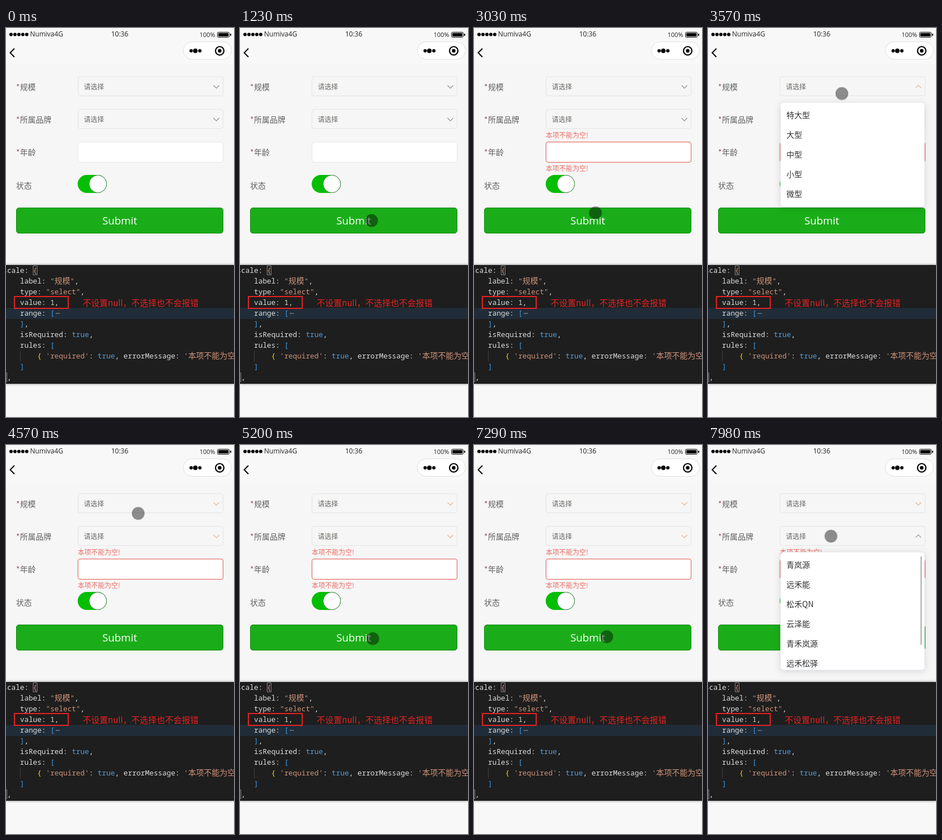
Animation, 407 px wide and 691 px high, one loop 8 s. Source, as an HTML page:

```html
<!DOCTYPE html>
<html lang="zh-CN">
<head>
<meta charset="utf-8">
<title>Form validation</title>
<style>
  html, body { margin: 0; width: 100%; height: 100%; overflow: hidden; background: #f6f6f6; }
  svg { display: block; width: 407px; height: 691px; }
  text { font-family: "Noto Sans CJK SC", "Noto Sans CJK", "Noto Sans", sans-serif; white-space: pre; }

  .status text { font: 12px "Open Sans", "Noto Sans", sans-serif; fill: #222; }
  .label { font-size: 14px; fill: #606060; }
  .star { fill: #8f5f58; }
  .hint { font-size: 12px; fill: #6a6a66; }
  .box { fill: none; stroke: #e5e5e5; }
  .err text { font-size: 12px; fill: #ee6a64; }
  .arrow { fill: none; stroke: #8c8f84; stroke-width: 1.1; }
  .submit { font: 18.8px "Open Sans", "Noto Sans", sans-serif; fill: #fff; text-anchor: middle; }

  .panel { fill: #fff; stroke: #ebeef5; filter: drop-shadow(0 2px 6px rgba(0, 0, 0, .13)); }
  .list text { font-size: 14px; fill: #303133; }

  .code text { font: 12.83px "Noto Sans Mono", "DejaVu Sans Mono", monospace; fill: #dcdcdc; }
  .code .s { fill: #ce9178; }
  .code .zh { font: 14px "Noto Sans CJK SC", "Noto Sans CJK", sans-serif; }
  .code .k { fill: #569cd6; }
  .code .b { fill: #3a9be8; }
  .code .y { fill: #ffd700; }
  .code .p { fill: #d7a08c; }
  .code .n { fill: #cfdcc6; }
  .code .d { fill: #808890; }

  .cursor { animation: move 8s linear infinite; }
  .shown { animation: shown 8s step-end infinite; }
  .field { fill: #fff; stroke: #e5e5e5; animation: invalid 8s step-end infinite; }
  .err { animation: slide 8s linear infinite; }
  .btn { fill: #1aad19; animation: press 8s step-end infinite; }
  .submit { animation: dim 8s step-end infinite; }
  .arrow { animation: tint 8s step-end infinite; }
  .open1 { animation: open1 8s step-end infinite; }
  .shut1 { animation: shut1 8s step-end infinite; }
  .open2 { animation: open2 8s step-end infinite; }
  .shut2 { animation: shut2 8s step-end infinite; }

  @keyframes shown { 0% { opacity: 0 } 9.625%, 100% { opacity: 1 } }
  @keyframes invalid { 0% { stroke: #e5e5e5 } 24.375%, 100% { stroke: #e2574f } }
  @keyframes slide {
    0%, 24.375% { opacity: 0; transform: translateY(-17px); animation-timing-function: ease }
    28.25%, 100% { opacity: 1; transform: none }
  }
  @keyframes press {
    0%, 24.375%, 68.75%, 100% { fill: #1aad19 }
    21.875%, 67.875% { fill: #179b16 }
  }
  @keyframes dim {
    0%, 24.375%, 68.75%, 100% { fill: #fff }
    21.875%, 67.875% { fill: rgba(255, 255, 255, .6) }
  }
  @keyframes tint { 0% { stroke: #8c8f84 } 44.625%, 100% { stroke: #dfb697 } }
  @keyframes open1 { 0%, 52.5%, 100% { opacity: 0 } 44.625% { opacity: 1 } }
  @keyframes shut1 { 0%, 52.5%, 100% { opacity: 1 } 44.625% { opacity: 0 } }
  @keyframes open2 { 0% { opacity: 0 } 98.5%, 100% { opacity: 1 } }
  @keyframes shut2 { 0% { opacity: 1 } 98.5%, 100% { opacity: 0 } }
  @keyframes move {
    0%, 9.625% { transform: translate(391px, 682px) }
    11.875% { transform: translate(345px, 560px) }
    13.5% { transform: translate(303px, 425px) }
    14.25% { transform: translate(283px, 366px) }
    15.375% { transform: translate(235px, 342px) }
    18.5%, 37.874% { transform: translate(216.5px, 332px) }
    37.875% { transform: translate(216.5px, 329px) }
    39.125% { transform: translate(243px, 260px) }
    40% { transform: translate(251px, 195px) }
    40.875% { transform: translate(247px, 138px) }
    41.75%, 46.374% { transform: translate(239px, 116.5px) }
    47.125%, 57.124% { transform: translate(238.5px, 108.5px) }
    57.125% { transform: translate(236px, 121px) }
    60% { transform: translate(231.5px, 232px) }
    62.5% { transform: translate(234px, 322px) }
    65%, 91.124% { transform: translate(237px, 344px) }
    91.125% { transform: translate(237px, 341px) }
    93.75% { transform: translate(230px, 236px) }
    96.375%, 98.499% { transform: translate(220px, 160.5px) }
    98.5%, 100% { transform: translate(219.5px, 162px) }
  }
</style>
</head>
<body>
<svg viewBox="0 0 407 691">
  <defs>
    <path id="down" d="M370.5 102l5 5 5-5"/>
    <clipPath id="view"><rect x="129" y="195" width="258" height="200"/></clipPath>
  </defs>
  <rect width="407" height="691" fill="#f6f6f6"/>
  <rect width="407" height="64" fill="#f8f8f8"/>
  <rect y="632" width="407" height="59" fill="#f8f8f8"/>

  <!-- status and title bar -->
  <g class="status">
    <path d="M9 11.5h.01M16 11.5h.01M23 11.5h.01M30 11.5h.01M37 11.5h.01" stroke="#000" stroke-width="6" stroke-linecap="round"/>
    <text x="43" y="15">Numiva4G</text>
    <text x="203" y="15" text-anchor="middle">10:36</text>
    <text x="345.5" y="16" style="font-size:11px">100%</text>
    <rect x="377.5" y="7.5" width="21" height="9" rx="2" fill="none" stroke="#000"/>
    <rect x="379" y="9" width="18" height="6" rx="1"/>
    <rect x="400" y="10" width="2" height="4" rx="1"/>
  </g>
  <path d="M15 36.5l-7.500 7.500 7.500 7.500" fill="none" stroke="#000" stroke-width="2"/>
  <rect x="316.500" y="24.500" width="86" height="31" rx="15.500" fill="#fff" stroke="#dfdfdf"/>
  <circle cx="330.500" cy="40.500" r="3"/>
  <circle cx="338" cy="40.500" r="4"/>
  <circle cx="346" cy="40.500" r="3"/>
  <circle cx="381.500" cy="40.500" r="7.500" fill="none" stroke="#000" stroke-width="2.200"/>
  <circle cx="381.500" cy="40.500" r="3.200"/>

  <!-- form -->
  <g class="label">
    <text x="18" y="110" class="star">*</text><text x="25" y="110">规模</text>
    <text x="18" y="168" class="star">*</text><text x="25" y="168">所属品牌</text>
    <text x="18" y="226" class="star">*</text><text x="25" y="226">年龄</text>
    <text x="18" y="285">状态</text>
  </g>
  <rect class="box" x="128.500" y="86.500" width="259" height="34" rx="3.500"/>
  <rect class="box" x="128.500" y="144.500" width="259" height="34" rx="3.500"/>
  <text class="hint" x="139" y="108.500">请选择</text>
  <text class="hint" x="139" y="166.500">请选择</text>
  <g class="shut1"><use href="#down" class="arrow"/></g>
  <g class="open1"><path d="M370.500 106.500l5-5 5 5" class="arrow"/></g>
  <g class="shut2"><use href="#down" y="58" class="arrow"/></g>
  <g class="open2"><path d="M370.500 164.500l5-5 5 5" fill="none" stroke="#9a9a9a" stroke-width="1.100"/></g>
  <g class="err">
    <text x="128" y="194.500">本项不能为空!</text>
    <text x="128" y="253.500">本项不能为空!</text>
  </g>
  <rect class="field" x="128.500" y="202.500" width="259" height="36" rx="3.500"/>
  <rect x="128" y="261" width="52" height="32" rx="16" fill="#04be02"/>
  <circle cx="164" cy="277" r="15.500" fill="#fff" stroke="#4c7a55" stroke-width=".9"/>
  <rect class="btn" x="18.500" y="319.500" width="369" height="45" rx="4.500" stroke="#158a14"/>
  <text class="submit" x="203" y="349">Submit</text>

  <!-- dropdowns -->
  <g class="list open1">
    <rect class="panel" x="129.500" y="132.500" width="257" height="185" rx="5.500"/>
    <text x="140" y="160">特大型</text>
    <text x="140" y="195">大型</text>
    <text x="140" y="230">中型</text>
    <text x="140" y="265">小型</text>
    <text x="140" y="300">微型</text>
  </g>
  <g class="list open2">
    <rect class="panel" x="129.500" y="190.500" width="257" height="209" rx="5.500"/>
    <g clip-path="url(#view)">
      <text x="140" y="218">青岚源</text>
      <text x="140" y="253">远禾能</text>
      <text x="140" y="288">松禾QN</text>
      <text x="140" y="323">云泽能</text>
      <text x="140" y="358">青禾岚源</text>
      <text x="140" y="393">远禾松驿</text>
    </g>
    <rect x="379" y="198" width="3" height="157" rx="1" fill="#c0c0c0"/>
  </g>

  <!-- code editor -->
  <g class="code">
    <rect y="421" width="407" height="211" fill="#1e1e1e" style="filter:drop-shadow(0 0 2px rgba(0,0,0,.5))"/>
    <rect y="497" width="407" height="20" fill="#202c38"/>
    <path d="M25.500 573v19" stroke="#404040"/>
    <path d="M48.500 422.500h7v16h-7zM-6.500 612.500h8v16h-8z" fill="none" stroke="#888"/>
    <text x="-5.800" y="435">scale: <tspan class="p">{</tspan></text>
    <text x="25" y="454">label: <tspan class="s">"<tspan class="zh">规模</tspan>"</tspan>,</text>
    <text x="25" y="473">type: <tspan class="s">"select"</tspan>,</text>
    <text x="25" y="492">value: <tspan class="n">1</tspan>,</text>
    <text x="25" y="511">range: <tspan class="b">[</tspan><tspan class="d" dx="2">⋯</tspan></text>
    <text x="25" y="530"><tspan class="b">]</tspan>,</text>
    <text x="25" y="549">isRequired: <tspan class="k">true</tspan>,</text>
    <text x="25" y="568">rules: <tspan class="b">[</tspan></text>
    <text x="55.800" y="587"><tspan class="y">{</tspan> <tspan class="s">'required'</tspan>: <tspan class="k">true</tspan>, errorMessage: <tspan class="s">'<tspan class="zh">本项不能为空</tspan></tspan></text>
    <text x="25" y="606"><tspan class="b">]</tspan></text>
    <text x="-5.800" y="625"><tspan class="p">}</tspan>,</text>
  </g>
  <rect x="15" y="477" width="96" height="21" fill="none" stroke="#e62222" stroke-width="2"/>
  <text x="137" y="494" font-size="15" fill="#e62222">不设置null，不选择也不会报错</text>

  <!-- touch pointer -->
  <g class="shown"><g class="cursor">
    <circle r="11" fill="#000" fill-opacity=".43" stroke="#000" stroke-opacity=".16" stroke-width="1.500"/>
  </g></g>
</svg>
</body>
</html>
```
